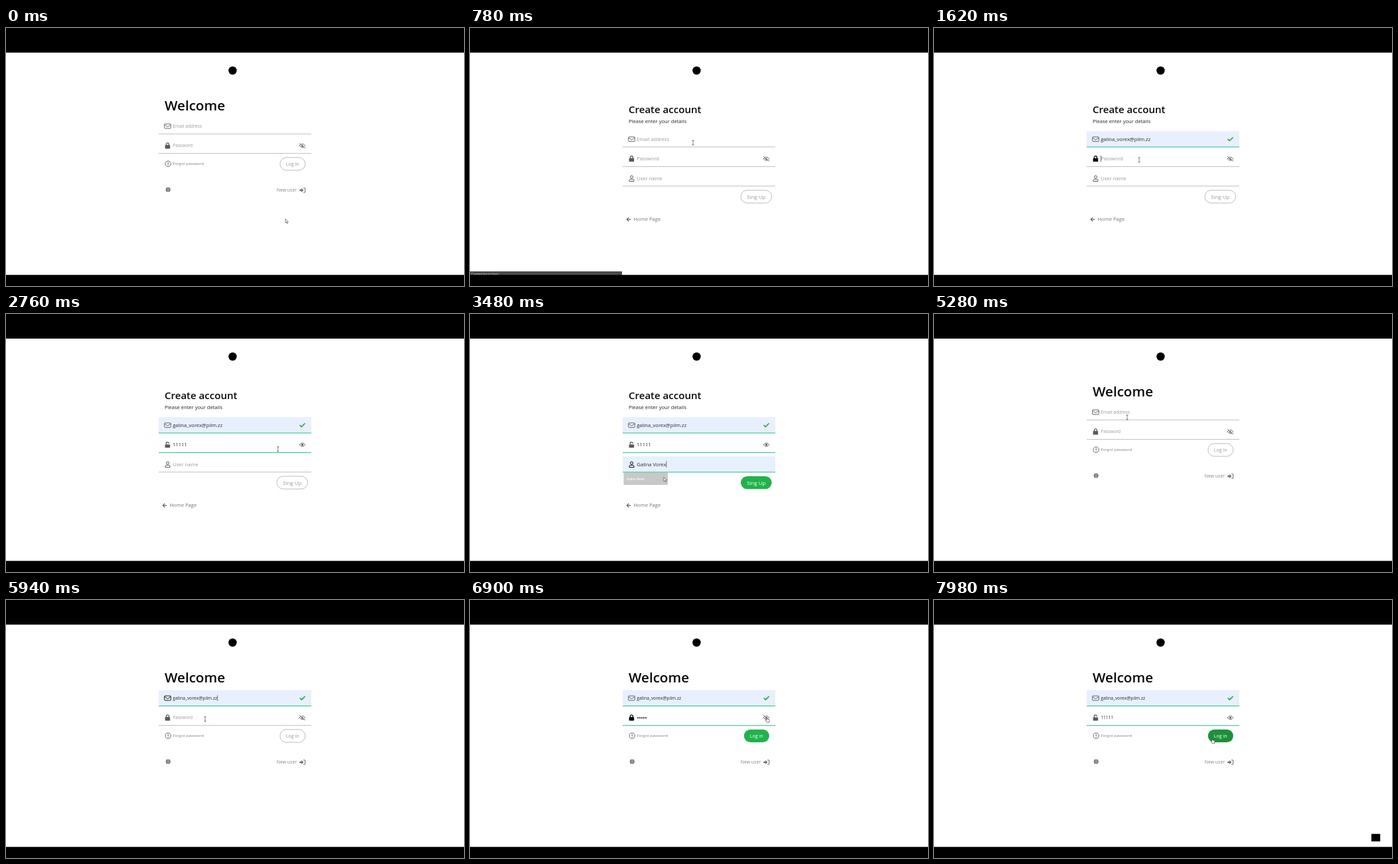
Write an HTML page that moves like this. It is 690 by 388 pixels and loops after 8000 ms.

```html
<!DOCTYPE html>
<html lang="en">
<head>
<meta charset="utf-8">
<title>Sign up and log in</title>
<style>
  html, body { margin: 0; width: 100%; height: 100%; overflow: hidden; background: #fff; }
  svg { display: block; width: 100vw; height: 100vh; }
  text { font-family: "Open Sans", "Noto Sans", sans-serif; white-space: pre; }
</style>
</head>
<body>
<svg id="stage" viewBox="0 0 690 388"></svg>
<script>
const LOOP = 8000, STEP = 60;
const EMAIL = 'galina_vorex@pilm.zz', NAME = 'Galina Vorex';
const GREEN = '#22b24c', GREEN_DARK = '#1c903c', TEAL = '#36c795';
const INK = '#0a0a0a', GREY = '#5a5a5a', PALE = '#9a9a9a';

const stage = document.getElementById('stage');
const pen = document.createElement('canvas').getContext('2d');

const clamp = v => Math.max(0, Math.min(1, v));
const ease = v => v * v * (3 - 2 * v);
const within = (t, a, b) => t >= a && t < b;
const ramp = (t, a, b) => clamp((t - a) / (b - a));

function textWidth(s, size) {
  pen.font = `100px "Open Sans", "Noto Sans", sans-serif`;
  return pen.measureText(s).width * size / 100;
}

// Text whose capitals are centred on y.
function label(x, y, size, s, fill, weight = 400, anchor = 'start') {
  return `<text x="${x}" y="${y + size * 0.357}" font-size="${size}" fill="${fill}" font-weight="${weight}" text-anchor="${anchor}">${s}</text>`;
}
function rect(x, y, w, h, fill, more = '') {
  return `<rect x="${x}" y="${y}" width="${w}" height="${h}" fill="${fill}" ${more}/>`;
}
function line(d, color, width = 0.9) {
  return `<path d="${d}" fill="none" stroke="${color}" stroke-width="${width}" stroke-linecap="round" stroke-linejoin="round"/>`;
}
function at(x, y, body) {
  return `<g transform="translate(${x} ${y})">${body}</g>`;
}

const icons = {
  mail: c => rect(-4.8, -3.4, 9.6, 6.8, 'none', `rx="1" stroke="${c}" stroke-width=".9"`) +
    line('M-4.5 -2L0 1L4.5 -2', c),
  lock: c => rect(-3.9, -0.9, 7.6, 5.3, c, 'rx=".9"') +
    line('M-2.1 -1V-2.2A2 2 0 0 1 1.9 -2.2V-1', c, 1.3),
  unlock: c => rect(-3.9, -0.4, 7.6, 4.8, c, 'rx=".9"') +
    line('M-2.1 -.6V-2A2 2 0 0 1 1.9 -2.2', c, 1.3),
  user: c => `<circle cy="-2" r="2" fill="none" stroke="${c}" stroke-width="1"/>` +
    line('M-3.6 4V3.2Q-3.6 1.2 -1.6 1.2H1.6Q3.6 1.2 3.6 3.2V4Z', c, 1),
  eye: c => line('M-4.2 0Q0 -5.6 4.2 0Q0 5.6 -4.2 0Z', c, 0.9) +
    `<circle r="1.6" fill="${c}"/>`,
  eyeOff: c => icons.eye(c) + line('M-3.4 -3.9L4.6 2.9', '#fff', 1) + line('M-4.1 -3.4L4.1 3.5', c, 0.9),
  check: () => line('M-3.4 .3L-1.2 2.4L3.5 -2.3', '#3cb54a', 1.9),
  alert: c => `<circle r="4.2" fill="none" stroke="${c}" stroke-width=".9"/>` +
    line('M0 -2.1V.5', c, 1) + `<circle cy="2.1" r=".6" fill="${c}"/>`,
  globe: c => `<circle r="3.5" fill="${c}"/>` +
    line('M-3.3 -1.1H3.3M-3.3 1.1H3.3M0 -3.4V3.4M-.6 -3.3Q-2.6 0 -.6 3.3M.6 -3.3Q2.6 0 .6 3.3', '#fff', 0.35),
  enter: c => `<path d="M-4.5 -1.2H-1.6V-3.2L1.8 0L-1.6 3.2V1.2H-4.5Z" fill="${c}"/>` +
    line('M1.7 -3.3H3.1Q4 -3.3 4 -2.4V2.4Q4 3.3 3.1 3.3H1.7', c, 1.1),
  back: c => line('M2.9 0H-2.7M0 -2.7L-2.8 0L0 2.7', c, 1.1)
};

const pointers = {
  arrow: '<path d="M0 0V6.2L1.4 5L2.4 7.2L3.4 6.7L2.5 4.7H4.3Z" fill="#fff" stroke="#222" stroke-width=".55"/>',
  beam: line('M-1.2 -3.4H1.2M0 -3.4V3.4M-1.2 3.4H1.2', '#333', 0.6),
  hand: '<path d="M0 .6Q.6 -.3 1.2 .6V2.9L4 3.5Q4.9 3.8 4.6 5.2L4 8H.8L-1.2 5.2Q-1.3 4 0 4.6Z" fill="#fff" stroke="#222" stroke-width=".6"/>'
};

// time, x, y, shape from that time on
const path = [
  [0, 421, 287, 'arrow'], [60, 421, 287, 'arrow'], [240, 429, 244, 'hand'],
  [420, 429, 243, 'arrow'], [540, 421, 236, 'arrow'], [660, 372, 196, 'arrow'],
  [780, 336, 172.5, 'beam'], [900, 322, 168, 'beam'], [1020, 318, 169, 'beam'],
  [1140, 298, 188, 'arrow'], [1260, 298, 188, 'arrow'], [1440, 309, 198.3, 'beam'],
  [2160, 309, 198.3, 'beam'], [2400, 446.5, 196, 'hand'], [2640, 446.5, 196, 'hand'],
  [2700, 430, 199, 'beam'], [2940, 300, 226, 'beam'], [3180, 300, 227, 'beam'],
  [3300, 292, 245.5, 'arrow'], [3480, 292, 245.5, 'arrow'], [3720, 428, 253, 'hand'],
  [4140, 428, 253, 'hand'], [4260, 395, 250, 'arrow'], [4740, 258, 288, 'hand'],
  [4860, 258, 288, 'hand'], [4980, 267, 318, 'arrow'], [5100, 284, 262, 'arrow'],
  [5280, 291, 155.5, 'beam'], [5340, 291, 155.5, 'beam'], [5460, 290, 167, 'arrow'],
  [5760, 290, 167, 'arrow'], [5940, 300, 179, 'beam'], [6600, 300, 179, 'beam'],
  [6840, 446.5, 176, 'hand'], [6960, 446.5, 176, 'hand'], [7260, 418.5, 207.8, 'hand'],
  [LOOP, 418.5, 207.8, 'hand']
];

function pointer(t) {
  const i = path.findIndex((p, n) => t >= p[0] && t < path[n + 1][0]);
  const [t0, x0, y0, shape] = path[i], [t1, x1, y1] = path[i + 1];
  const k = ease(ramp(t, t0, t1));
  return at(x0 + (x1 - x0) * k, y0 + (y1 - y0) * k, pointers[shape]);
}

// f: icon, hint, value, dots, auto, ok, focus, side
function field(y, size, f) {
  const dotGap = size * 0.45;
  let out = f.auto ? rect(230, y - 12, 230, 23.6, '#e8f0fe') : '';
  out += rect(230, y + 11.2, 230, f.ok ? 1.1 : 0.9, f.ok ? TEAL : '#b9b9b9');
  out += at(243.5, y, icons[f.icon](f.focus ? INK : GREY));
  let end = 251.4;
  if (f.dots) {
    for (let i = 0; i < f.dots; i++)
      out += `<circle cx="${253 + i * dotGap}" cy="${y + 0.2}" r="${size * 0.155}" fill="${INK}"/>`;
    end = 252.4 + f.dots * dotGap;
  } else {
    out += label(251.2, y, size, f.value || f.hint, f.value ? '#2b2b2b' : PALE);
    if (f.value) end += textWidth(f.value, size);
  }
  if (f.focus && !f.noCaret) out += rect(end, y - size * 0.65, 0.6, size * 1.3, '#222');
  if (f.side) out += at(446.5, y, icons[f.side](GREY));
  return out;
}

function password(t, start, gap, reveal, focus) {
  const count = Math.floor(clamp((t - start + gap) / (gap * 5)) * 5 + 1e-6);
  const shown = t >= reveal;
  return {
    icon: shown ? 'unlock' : 'lock', hint: 'Password', side: shown ? 'eye' : 'eyeOff',
    value: shown ? '1'.repeat(count) : '', dots: shown ? 0 : count, ok: count === 5, focus
  };
}

function button(x, y, w, s, size, on, hover) {
  const look = on ? [hover ? GREEN_DARK : GREEN, 'none', '#fff'] : ['#fff', '#b5b5b5', '#999'];
  return rect(x, y, w, 19.2, look[0], `rx="9.6" stroke="${look[1]}" stroke-width=".9"`) +
    label(x + w / 2, y + 10, size, s, look[2], 500, 'middle');
}

function suggestion(y, s, w, alpha) {
  return alpha <= 0 ? '' : `<g opacity="${alpha}">` +
    rect(231.5, y, w, 18.5, '#3c3c3c', 'rx=".8"') + '</g>' +
    label(236, y + 9.5, 4.4, s, '#fff', 600);
}

// Opens at a, closes after b with a short fade.
function popAlpha(t, a, b) {
  return within(t, a, b) ? 1 : within(t, b, b + 60) ? 0.28 : 0;
}

function welcome(t) {
  const back = t >= 4920;
  const filled = back && t >= 5520, sent = back && t >= 5640;
  const pass = password(back ? t : 0, 6480, 60, back ? 6960 : LOOP, within(t, 6240, 6960));
  pass.noCaret = t >= 6840;
  const onLink = within(t, 240, 420);
  return label(239, 116.9, 20.6, 'Welcome', INK, 600) +
    field(147.6, 6.75, {
      icon: 'mail', hint: 'Email address', value: filled ? EMAIL : '', auto: filled, ok: sent,
      focus: within(t, 5340, 6240), noCaret: filled && !sent, side: sent ? 'check' : ''
    }) +
    field(177, 6.65, pass) +
    at(244.2, 204.2, icons.alert(GREY)) + label(251.5, 203.7, 6, 'Forgot password', '#808080') +
    button(412.8, 194.8, 38, 'Log in', 7.1, pass.ok, t >= 7320) +
    at(244.2, 242.9, icons.globe('#555')) +
    label(407.8, 243.2, 6.9, 'New user', onLink ? INK : '#858585', 500) +
    at(446.6, 244, icons.enter(onLink ? INK : '#777')) +
    (back ? suggestion(159.8, EMAIL, 66.5, popAlpha(t, 5400, 5640)) : '');
}

function create(t) {
  const mailIn = t >= 1200, mailOk = t >= 1260, nameIn = t >= 3300, nameOk = t >= 3420;
  const onLink = t >= 4740;
  return label(239, 122.3, 15.05, 'Create account', INK, 600) +
    label(239, 140.2, 7.58, 'Please enter your details', '#222') +
    field(167.2, 7.55, {
      icon: 'mail', hint: 'Email address', value: mailIn ? EMAIL : '', auto: mailIn, ok: mailOk,
      focus: within(t, 960, 1560), noCaret: mailIn && !mailOk, side: mailOk ? 'check' : ''
    }) +
    field(196.7, 7.5, password(t, 1740, 120, 2520, within(t, 1560, 2520))) +
    field(226.1, 7.55, {
      icon: 'user', hint: 'User name', value: nameIn ? NAME : '', auto: nameIn, ok: nameOk,
      focus: within(t, 2940, 3960), noCaret: nameIn && !nameOk
    }) +
    button(408, 244, 46.5, 'Sing Up', 7.85, nameOk, within(t, 3720, 4200)) +
    at(239, 287.9, icons.back(onLink ? INK : GREY)) +
    label(246.2, 287.6, 7.7, 'Home Page', onLink ? INK : '#777') +
    suggestion(179.5, EMAIL, 66.5, popAlpha(t, 1020, 1260)) +
    suggestion(238.6, NAME, 66.5, popAlpha(t, 3000, 3420 + 60));
}

function badge(t) {
  const spans = [[360, 720], [4020, 4620], [7740, LOOP + 600]];
  const span = spans.find(s => within(t, s[0], s[1]));
  if (!span) return '';
  const k = Math.min(ramp(t, span[0] - 60, span[0] + 180), ramp(span[1] - t, 0, 240));
  return `<g opacity="${k}" transform="translate(0 ${(1 - k) * 4})">` +
    rect(657.5, 350.5, 16, 14.5, '#000', 'rx="3" opacity=".05"') +
    rect(659, 351.8, 13.2, 11.2, '#000') + '</g>';
}

function draw(t) {
  const page = within(t, 420, 4920) ? create(t) : welcome(t);
  const loading = within(t, 300, 900) || within(t, 4800, 5220);
  stage.innerHTML = rect(0, 0, 690, 388, '#fff') +
    '<circle cx="341.4" cy="64" r="6.2" fill="#000"/>' +
    page + badge(t) +
    (loading ? rect(0, 366, 229, 6, '#4b4b4b') + label(2, 370, 4.6, 'Connecting to host…', '#d5d5d5') : '') +
    rect(0, 0, 690, 37, '#000') + rect(0, 371.3, 690, 16.7, '#000') +
    pointer(t);
}

let last = -1;
function tick() {
  const t = Math.floor((performance.now() % LOOP) / STEP) * STEP;
  if (t !== last) draw(last = t);
  requestAnimationFrame(tick);
}
tick();
</script>
</body>
</html>
```
